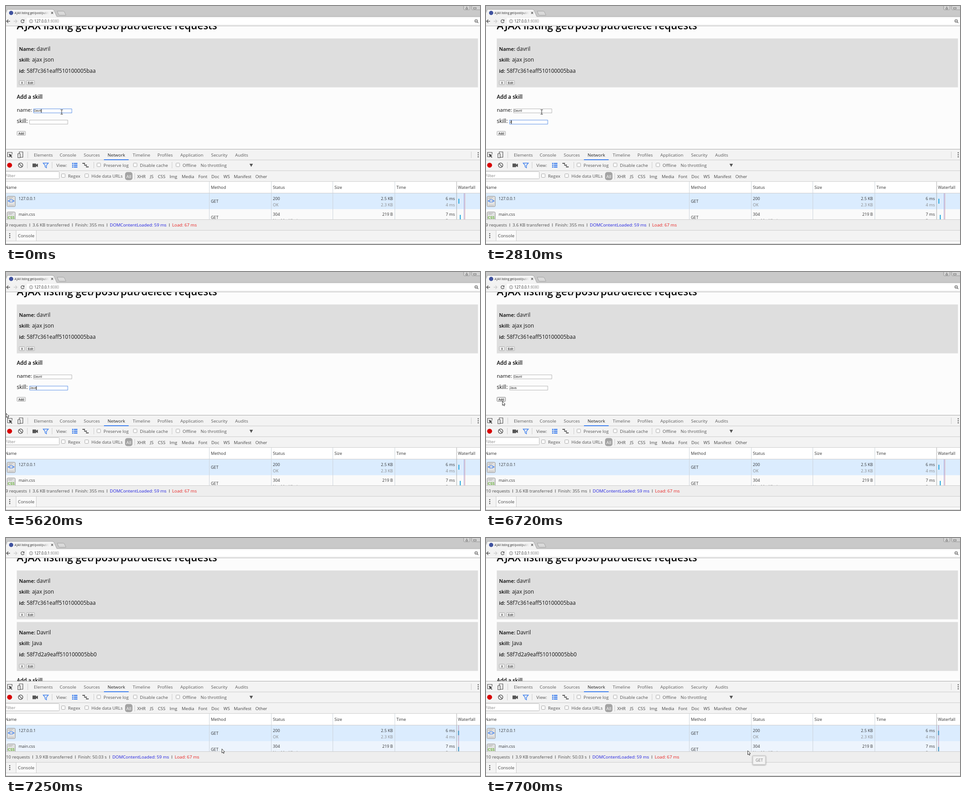
Write an HTML page with a canvas that moves like this. It is 1055x531 px and loops after 8 s.

```html
<!DOCTYPE html>
<html lang="en">
<head>
<meta charset="utf-8">
<title>Skill list</title>
<style>
html, body { margin: 0; width: 1055px; height: 531px; overflow: hidden; background: #fcfcfc; }
canvas { display: block; }
</style>
</head>
<body>
<canvas id="stage" width="1055" height="531"></canvas>
<script>
const c = document.getElementById('stage').getContext('2d');
const LOOP = 8000;
const UI = '"Open Sans", "Noto Sans", sans-serif';
const ARIAL = '"Liberation Sans", Arial, sans-serif';

// Drawing helpers
function text(s, x, y, size = 9.8, color = '#555', { font = UI, weight = 400, align = 'left' } = {}) {
  c.font = `${weight} ${size}px ${font}`;
  c.textAlign = align;
  c.fillStyle = color;
  c.fillText(s, x, y);
  return c.measureText(s).width;
}
function box(x, y, w, h, color) {
  c.fillStyle = color;
  c.fillRect(x, y, w, h);
}
function frame(x, y, w, h, fill, line, radius = 0) {
  c.beginPath();
  c.roundRect(x + .5, y + .5, w - 1, h - 1, radius);
  c.fillStyle = fill;
  c.fill();
  c.lineWidth = 1;
  c.strokeStyle = line;
  c.stroke();
}
function line(d, color, width = 1) {
  c.lineWidth = width;
  c.strokeStyle = color;
  c.stroke(new Path2D(d));
}
function shape(d, color) {
  c.fillStyle = color;
  c.fill(new Path2D(d));
}
function dot(x, y, r, color) {
  c.beginPath();
  c.arc(x, y, r, 0, 7);
  c.fillStyle = color;
  c.fill();
}
function dots(x, y, gap) {
  for (let i = -1; i < 2; i++) dot(x, y + i * gap, 1.3, '#555');
}
function clipped(x, y, w, h, draw) {
  c.save();
  c.beginPath();
  c.rect(x, y, w, h);
  c.clip();
  draw();
  c.restore();
}

// Value of the last step that has begun
const at = (t, steps) => steps.findLast(s => s[0] <= t).slice(1);

const nameSteps = [[0, 'Davri'], [150, 'Davril']];
const skillSteps = [[0, ''], [2810, 'J'], [3580, 'Ja'], [3710, 'Jav'], [4130, 'Ja'], [4530, 'Jav'], [4700, 'Java']];
const caretSteps = [[0, 1], [1080, 0], [1640, 1], [2200, 0], [2660, 1], [3270, 0], [3580, 1], [5150, 0], [5620, 1], [6160, 0]];
const focusSteps = [[0, 'name'], [650, 'skill'], [6460, 'button']];
const mouseSteps = [
  [0, 124, 236], [5150, 116, 251], [5320, 46, 300], [5460, 0, 321], [5620, 0, 315], [5760, 9, 309],
  [5880, 22, 297], [6000, 33, 287], [6160, 36, 288], [7120, 330, 493], [7250, 480, 470], [7400, 593, 493],
  [7560, 593, 481], [7700, 582, 474]
];

function browser() {
  box(0, 0, 1055, 24, '#c9c9c9');
  shape('M-4 24L3 8H103Q106 8 107 10L113 24Z', '#f3f3f3');
  line('M-4 24L3 7.5H103Q106 7.5 107 10L113 23.5H1055', '#a9a9a9');
  shape('M114 11.5H127Q129 11.5 130 13L133.5 20.5H120Q118 20.5 117 19Z', '#d9d9d9');
  line('M114 11.5H127Q129 11.5 130 13L133.5 20.5H120Q118 20.5 117 19Z', '#a5a5a5');
  dot(11.5, 15.5, 4.7, '#3f529f');
  const fade = c.createLinearGradient(80, 0, 96, 0);
  fade.addColorStop(0, '#222');
  fade.addColorStop(1, '#2220');
  clipped(19, 8, 77, 14, () => text('AJAX listing get/post/put/delete', 19, 17.7, 6.25, fade));
  line('M100.5 13.2L104.9 17.6M104.9 13.2L100.5 17.6', '#444', 1.1);

  frame(1018, -4, 15, 13, '#d2d2d2', '#999', 2);
  frame(1036, -4, 24, 13, '#d2d2d2', '#999', 2);
  line('M1023.5 7V4.5H1027.5V7ZM1025.5 4.5V1M1040.5 3.5H1046.5V6.5H1040.5Z', '#777');

  box(0, 24, 1055, 20, '#f2f2f2');
  c.beginPath();
  c.roundRect(46, 26.5, 1020, 14.5, 2);
  c.fillStyle = '#fff';
  c.fill();
  line('M9 34H1.5M5 30.3L1.3 34L5 37.7', '#555', 1.3);
  line('M17 34H24.5M21 30.3L24.7 34L21 37.7', '#ccc', 1.3);
  line('M39.6 31.6A3.5 3.5 0 1 0 40.3 35', '#555', 1.3);
  shape('M41 29.7V33.4H37.2Z', '#555');
  line('M59.5 34A3.7 3.7 0 1 0 52.1 34A3.7 3.7 0 1 0 59.5 34M55.8 33.5V36.2M55.8 31.5V32.6', '#666', .9);
  text(':8080', 63 + text('127.0.0.1', 63, 37, 8.1, '#222'), 37, 8.1, '#888');
  line('M1049.5 33.2A3 3 0 1 0 1043.5 33.2A3 3 0 1 0 1049.5 33.2M1048.6 35.4L1051.3 38M1045 33.2H1048', '#555', 1.1);
  box(0, 44, 1055, 1, '#b5b5b5');
}

function button(s, x, y, w, state) {
  const border = state ? '#777' : '#a9a9a9';
  frame(x, y, w, 10, state === 'down' ? '#d5d5d5' : '#f0f0f0', border, 1);
  text(s, x + w / 2, y + 7.6, 7.1, '#111', { font: ARIAL, align: 'center' });
}

function card(y, name, skill, id) {
  box(24, y + .5, 1026.5, 109, '#dedede');
  const rows = [['Name:', name, 68], ['skill:', skill, 58], ['id:', id, 46]];
  rows.forEach(([key, value, x], i) => {
    const base = y + 27.6 + i * 24.7;
    text(key, 29, base, 11.4, '#000', { weight: 600 });
    text(value, x, base, 11.9, '#111');
  });
  button('X', 29, y + 94, 13);
  button('Edit', 45, y + 94, 19);
}

function input(x, y, value, focused, caret) {
  frame(x, y, 86, 10, '#fff', focused ? '#5b90e6' : '#b4b4b4');
  const w = text(value, x + 1, y + 7.1, 7.1, '#222', { font: ARIAL });
  if (focused && caret) box(Math.round(x + w), y + 1, 1, 8, '#111');
}

function page(t) {
  box(0, 44, 1055, 276, '#fcfcfc');
  text('AJAX listing get/post/put/delete requests', 24, 52, 22.6, '#000', { weight: 600 });
  card(72, 'davril', 'ajax json', '58f7c361eaff510100005baa');
  const added = t >= 6840;
  if (added) card(187, 'Davril', 'Java', '58f7d2a9eaff510100005bb0');
  text('Add a skill', 24, added ? 322 : 207.4, 11.7, '#000', { weight: 600 });
  if (added) return;
  const [focus] = at(t, focusSteps), [caret] = at(t, caretSteps);
  text('name:', 24, 236, 11.6, '#111');
  text('skill:', 24, 261, 12, '#111');
  input(61, 229, at(t, nameSteps)[0], focus === 'name', caret);
  input(52, 254, at(t, skillSteps)[0], focus === 'skill', caret);
  button('Add', 24, 279, 20, focus === 'button' && (t < 6600 ? 'down' : 'focus'));
}

function check(x, y, s) {
  frame(x, y, 9, 9, '#fafafa', '#aaa', 1);
  text(s, x + 15, y + 8.5);
}

function toolbars() {
  box(0, 320, 1055, 72, '#f3f3f3');
  box(0, 319, 1055, 1, '#a8a8a8');
  [343, 367, 391].forEach(y => box(0, y, 1055, 1, '#ccc'));

  line('M9 336.5H3.5V326.5H13.5V331', '#555', 1.2);
  shape('M6.5 329.5L14 333L11.2 334.2L14 337.2L12.6 338.5L9.8 335.5L8.5 338Z', '#444');
  line('M29.5 329V325.5H37.5V337.5H32M26.5 329.5H31.5V338.5H26.5Z', '#555', 1.2);
  const tabs = { Elements: 62, Console: 119.5, Sources: 173, Network: 226, Timeline: 282, Profiles: 337, Application: 388, Security: 456.5, Audits: 510 };
  for (const s in tabs) text(s, tabs[s], 335.7, 9.8, s === 'Network' ? '#222' : '#5a5a5a');
  box(218, 342, 55, 2, '#3f80ee');
  line('M48.5 325V339M1035.5 325V339M47.5 348V362M102.5 348V362M195.5 348V362M369.5 348V362M286.5 373V387', '#ccc');
  dots(1051, 332, 4.5);

  dot(8, 355.2, 5.5, '#d80000');
  line('M37.5 355.3A5 5 0 1 0 27.5 355.3A5 5 0 1 0 37.5 355.3M29 351.8L36 358.8', '#555', 1.5);
  shape('M59 351.5H67V354L71 351.5V359.5L67 357V359.5H59Z', '#555');
  line('M82.8 350.5H94.2L90 355.5V361L87 359V355.5Z', '#3f80ee', 1.4);
  text('View:', 112, 358.7);
  for (let i = 0; i < 3; i++) {
    box(147, 350 + 4 * i, 3, 2.5, '#3f80ee');
    box(151, 350 + 4 * i, 8, 2.5, '#3f80ee');
    box(170 + 4 * i, 350 + 4 * i, 6, 2, '#555');
  }
  line('M174.5 351V355H178M178.5 355V359H181', '#555');
  check(202, 350, 'Preserve log');
  check(283, 350, 'Disable cache');
  check(378, 350, 'Offline');
  text('No throttling', 433, 358.5);
  shape('M542 352H549.6L545.8 359Z', '#555');

  frame(-5, 369, 124, 17, '#fff', '#bbb', 1);
  text('Filter', -1.5, 381.5, 9.5, '#888');
  check(123, 374, 'Regex');
  check(175, 374, 'Hide data URLs');
  c.beginPath();
  c.roundRect(265, 370.5, 16.5, 18, 5);
  c.fillStyle = '#a3a3a3';
  c.fill();
  text('All', 273.3, 383.6, 9.8, '#fff', { align: 'center' });
  const kinds = { XHR: 292, JS: 320.5, CSS: 338, Img: 364, Media: 391, Font: 428, Doc: 457, WS: 484, Manifest: 507, Other: 555 };
  for (const s in kinds) text(s, kinds[s], 383.7, 9.7, '#444');
}

function fileIcon(y, label, color, size) {
  frame(2, y, 19, 24, '#e2e2e2', '#8c8c8c', 2);
  line(`M5 ${y + 3.5}H16M5 ${y + 5.5}H13M5 ${y + 20.5}H18`, '#b0b0b0');
  text(label, 11.5, y + 16, size, color, { weight: 700, align: 'center' });
}

function row(y, name, status, note, sizes, times) {
  const right = { align: 'right' };
  text(name, 28, y + 14.5, 9, '#333');
  text('GET', 456, y + 21.3, 9.1, '#333');
  text(status, 594, y + 14.5, 9.1, '#333');
  text(note, 594, y + 28.7, 9, '#888');
  sizes.forEach((s, i) => text(s, 861, y + 14.5 + 14.2 * i, 9, i ? '#888' : '#333', right));
  times.forEach((s, i) => text(s, 999, y + 14.5 + 14.2 * i, 9, i ? '#888' : '#333', right));
}

function requests(t) {
  const done = t >= 6840;
  const hover = t >= 7250 && t < 7400 || t >= 7700;
  box(0, 392, 1055, 26, '#fff');
  box(0, 418, 1055, 35.5, '#dbecfe');
  box(0, 453.5, 1055, 23.5, hover ? '#edf4fd' : '#fafafa');
  box(0, 417, 1055, 1, '#ccc');
  line('M452.5 392V477M590.5 392V477M727.5 392V477M865.5 392V477', '#ccd3da');
  const heads = { Name: -2, Method: 456, Status: 594, Size: 731, Time: 869, Waterfall: 1006 };
  for (const s in heads) text(s, heads[s], 408.4, 9.2, '#333');
  clipped(0, 418, 1055, 59, () => {
    fileIcon(424, '<>', '#3f80ee', 14);
    fileIcon(459, 'CSS', '#6fb643', 8.8);
    row(418, '127.0.0.1', '200', 'OK', ['2.5 KB', '2.3 KB'], ['6 ms', '4 ms']);
    row(453.5, 'main.css', '304', 'Not Modified', ['219 B'], ['7 ms', '5 ms']);
    if (done) {
      box(1007, 418, 1, 59, '#b98aa8');
      box(1006.5, 430, 1.8, 10, '#2a86b8');
      box(1006.5, 466, 1.8, 11, '#2a86b8');
    } else {
      box(1019, 418, 1, 59, '#9d9ddb');
      box(1021, 418, 1, 59, '#dda0a8');
      box(1007, 430, 2, 11, '#22a5dc');
      box(1010, 466, 2, 11, '#22a5dc');
    }
  });
  box(1002.5, 392, 1, 85, '#aaa');
}

function summary(t, x, y, size, muted) {
  const parts = [
    [(t < 6720 ? '9' : '10') + ' requests'],
    [(t < 6840 ? '3.6' : '3.9') + ' KB transferred'],
    ['Finish: ' + (t < 6840 ? '355 ms' : '50.03 s')],
    ['DOMContentLoaded: 59 ms', '#1f1fe0'],
    ['Load: 67 ms', '#e8201f']
  ];
  parts.forEach(([s, color], i) => {
    if (i) {
      box(x + size * .6, y - size * .72, 1, size * .74, muted || '#555');
      x += size * 1.28;
    }
    x += text(s, x, y, size, muted || color || '#4a4a4a');
  });
}

function footer(t) {
  box(0, 477, 1055, 24, '#eeeeee');
  box(0, 476, 1055, 1, '#ccc');
  summary(t, t < 6720 ? -1 : 0, 492.1, 9.75);
  box(0, 500, 1055, 25, '#f3f3f3');
  box(0, 500, 1055, 1, '#ccc');
  box(23, 501, 45, 24, '#fafafa');
  line('M22.5 501V524M67.5 501V524', '#ccc');
  dots(8.3, 512.3, 4.3);
  text('Console', 26.5, 516.4, 9.8, '#444');
  box(0, 525, 1055, 6, '#fff');
  box(0, 524, 1055, 1, '#ccc');
  box(0, 530, 1055, 1, '#bbb');
}

function tooltip(x, y, w, h) {
  c.shadowColor = '#0004';
  c.shadowBlur = 3;
  c.shadowOffsetY = 1;
  frame(x, y, w, h, '#f4f4f4', '#c6c6c6', 1);
  c.shadowColor = 'transparent';
}

function mouse(t) {
  const [x, y] = at(t, mouseSteps);
  c.save();
  c.translate(x, y);
  if (t < 5320) {
    line('M-2.5 -4.5H-.7L0 -4L.7 -4.5H2.5M0 -4V5M-2.5 5.5H-.7L0 5L.7 5.5H2.5', '#222');
  } else {
    const arrow = 'M.5 .5V9.5L2.5 7.7L4 10.8L5.4 10.2L4 7.1H6.8Z';
    shape(arrow, '#fff');
    line(arrow, '#222', .9);
  }
  c.restore();
}

function draw(t) {
  page(t);
  browser();
  toolbars();
  requests(t);
  footer(t);
  if (t >= 7700) {
    tooltip(593, 485, 30, 21);
    text('GET', 600, 499.3, 9, '#777');
  } else if (t >= 7560) {
    tooltip(613, 503, 407, 22);
    summary(t, 620.5, 518.2, 9.05, '#888');
  }
  mouse(t);
}

function tick(now) {
  draw(now % LOOP);
  requestAnimationFrame(tick);
}
requestAnimationFrame(tick);
</script>
</body>
</html>
```
